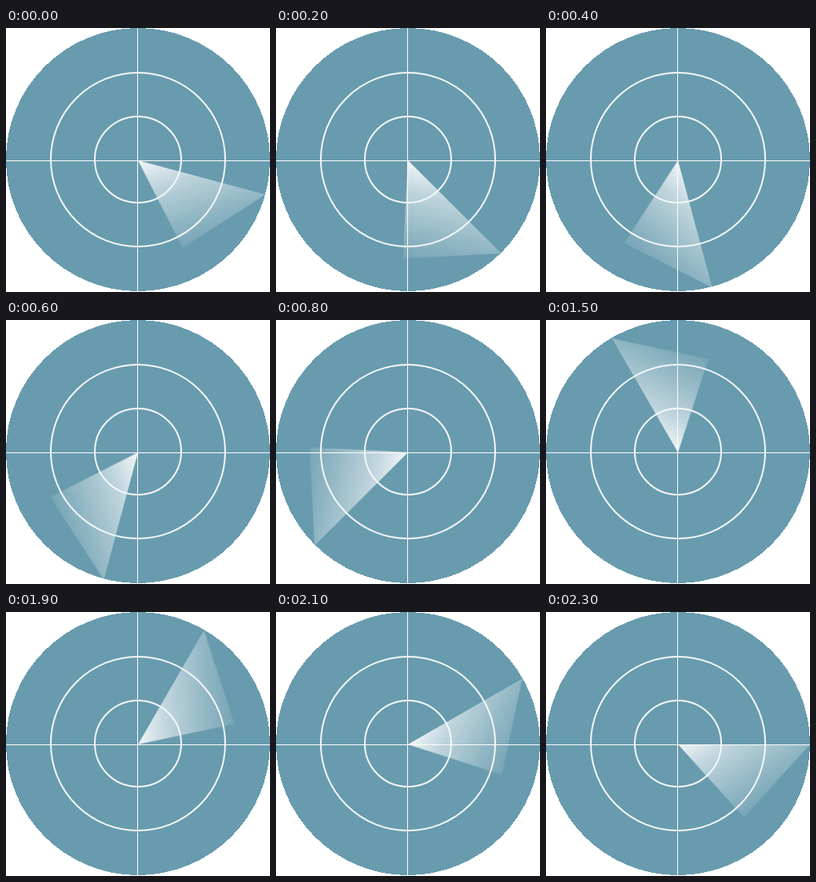
Write an HTML page that moves like this. It is 330x331 px and loops after 2.4 s.

```html
<!DOCTYPE html>
<html lang="en">
<head>
<meta charset="utf-8">
<title>Radar sweep</title>
<style>
  html, body {
    margin: 0;
    width: 100%;
    height: 100%;
    overflow: hidden;
    background: #fff;
  }
  svg { display: block; }
  .disc { fill: #689bae; shape-rendering: crispEdges; }
  .rings { fill: none; stroke: #f4f7f8; stroke-width: 2; }
  .axes { fill: #fdfcfa; shape-rendering: crispEdges; }
  .sweep {
    transform-origin: 0 0;
    animation: sweep 2400ms steps(24) infinite;
  }
  @keyframes sweep {
    from { transform: rotate(15deg); }
    to { transform: rotate(375deg); }
  }
</style>
</head>
<body>
<svg width="330" height="331" viewBox="0 0 330 331">
  <defs>
    <linearGradient id="fade" gradientUnits="userSpaceOnUse" x1="0" y1="0" x2="69" y2="107">
      <stop offset="0" stop-color="#fff" stop-opacity=".9"/>
      <stop offset=".3" stop-color="#fff" stop-opacity=".57"/>
      <stop offset=".7" stop-color="#fff" stop-opacity=".27"/>
      <stop offset="1" stop-color="#fff" stop-opacity=".07"/>
    </linearGradient>
  </defs>
  <circle class="disc" cx="165" cy="165" r="165"/>
  <g transform="translate(165 166)">
    <path class="sweep" d="M0 0H165L82.5 91.5Z" fill="url(#fade)"/>
  </g>
  <g class="rings">
    <circle cx="165" cy="165" r="54"/>
    <circle cx="165" cy="165" r="109"/>
  </g>
  <g class="axes">
    <rect x="164" y="0" width="1" height="330"/>
    <rect x="0" y="166" width="330" height="1"/>
  </g>
</svg>
</body>
</html>
```
